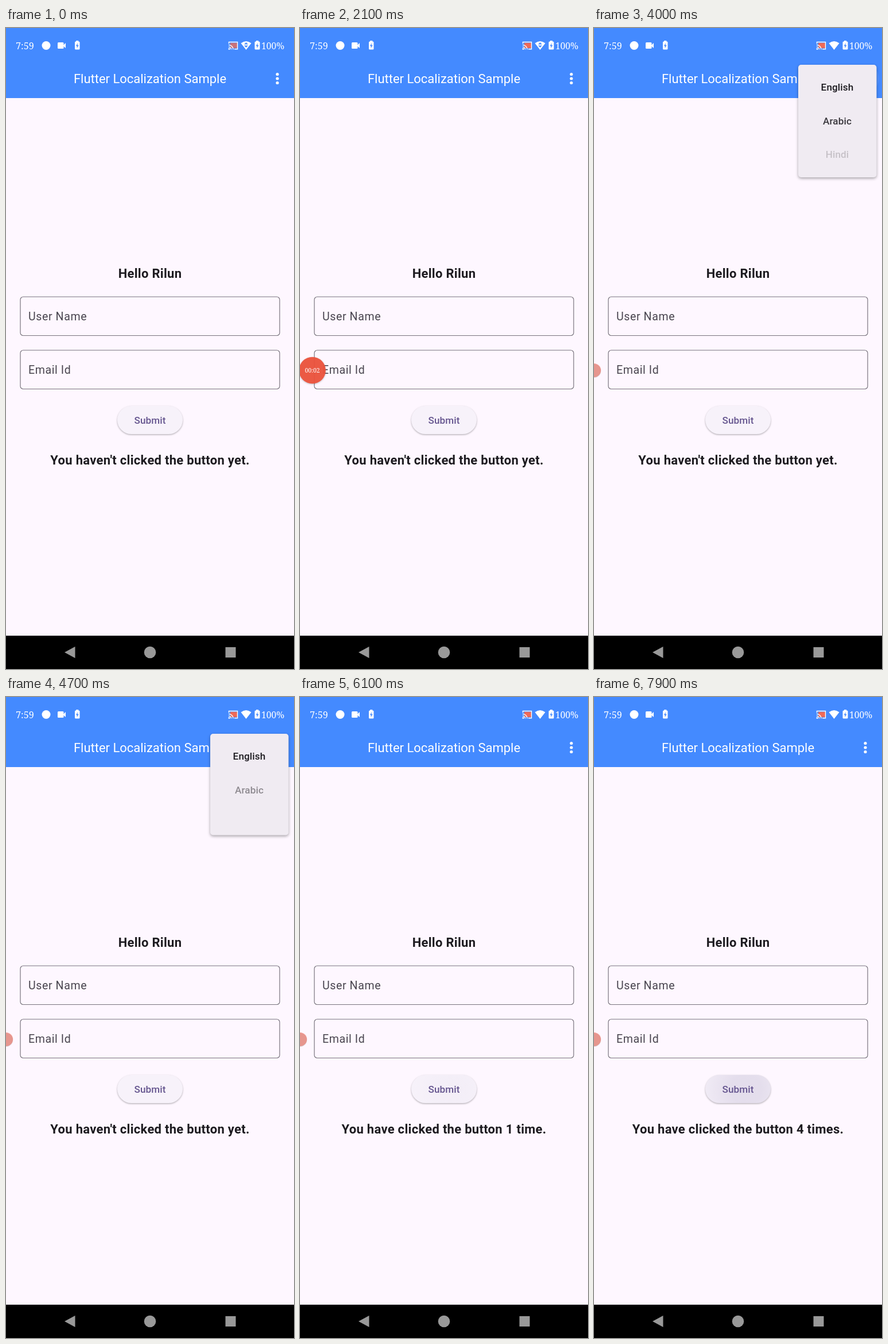
Recreate the animation shown at these times as an HTML page with a canvas. Size 502 by 1116 pixels, loop 8000 ms.

```html
<!DOCTYPE html>
<html lang="en">
<head>
<meta charset="utf-8">
<title>Flutter Localization Sample</title>
<style>
  html, body { margin: 0; width: 100%; height: 100%; overflow: hidden; background: #fef7ff; }
  canvas { display: block; width: 502px; height: 1116px; }
</style>
</head>
<body>
<canvas id="stage" width="502" height="1116"></canvas>
<script>
const ctx = document.getElementById('stage').getContext('2d');
const LOOP = 8000, STEP = 100;
const BLUE = '#448aff', INK = '#1d1b20', LABEL = '#49454f', PURPLE = '#65558f';
const SANS = 'Roboto, sans-serif', SERIF = '"Noto Serif", serif';
const BODY = `600 21.98px ${SANS}`, BUTTON = `500 17.1px ${SANS}`, INPUT = `19.54px ${SANS}`;

const clamp = x => Math.max(0, Math.min(1, x));
const interval = (x, from, to) => clamp((x - from) / (to - from));

function text(str, x, y, font, color, { align = 'center', spacing = 0 } = {}) {
  ctx.font = font;
  ctx.fillStyle = color;
  ctx.textAlign = align;
  ctx.letterSpacing = spacing + 'px';
  ctx.fillText(str, x, y);
}

function rect(x, y, w, h, color) {
  ctx.fillStyle = color;
  ctx.fillRect(x, y, w, h);
}

function disc(x, y, r, color) {
  ctx.fillStyle = color;
  ctx.beginPath();
  ctx.arc(x, y, r, 0, Math.PI * 2);
  ctx.fill();
}

function polygon(color, ...points) {
  ctx.fillStyle = color;
  ctx.beginPath();
  points.forEach(([x, y]) => ctx.lineTo(x, y));
  ctx.fill();
}

function roundPath(x, y, w, h, r) {
  ctx.beginPath();
  ctx.roundRect(x, y, w, h, r);
}

function shadow(color, blur, dy) {
  ctx.shadowColor = color;
  ctx.shadowBlur = blur;
  ctx.shadowOffsetY = dy;
}

// Saves and restores the drawing state around a group.
function group(draw) {
  ctx.save();
  draw();
  ctx.restore();
}

function battery(x, y, w) {
  rect(x + w / 2 - 2, y, 4, 3, '#fff');
  ctx.fillStyle = '#fff';
  roundPath(x, y + 1.5, w, 14, 1.5);
  ctx.fill();
  const c = x + w / 2;
  polygon(BLUE, [c + .8, y + 4], [c - 2.4, y + 9.5], [c - .3, y + 9.5],
    [c - .8, y + 13.5], [c + 2.4, y + 8], [c + .3, y + 8]);
}

function castIcon(bright) {
  rect(391, 26, 12, 9, bright ? '#ee6a58' : '#c9727a');
  ctx.strokeStyle = '#fff';
  ctx.lineWidth = 1.4;
  ctx.beginPath();
  ctx.moveTo(388.5, 27.5);
  ctx.lineTo(388.5, 24.5);
  ctx.lineTo(403.5, 24.5);
  ctx.lineTo(403.5, 36.8);
  ctx.lineTo(398, 36.8);
  ctx.stroke();
  for (const r of [4.5, 8]) {
    ctx.beginPath();
    ctx.arc(388, 37.5, r, -Math.PI / 2, 0);
    ctx.stroke();
  }
  disc(389, 36.5, 1.4, '#fff');
}

function wifiIcon(traffic) {
  ctx.fillStyle = '#fff';
  ctx.beginPath();
  ctx.moveTo(418.5, 38);
  ctx.lineTo(409.5, 26.5);
  ctx.quadraticCurveTo(418.5, 19.5, 427.5, 26.5);
  ctx.fill();
  if (traffic) {
    polygon(BLUE, [415, 28.5], [422, 28.5], [418.5, 25]);
    polygon(BLUE, [415, 30.5], [422, 30.5], [418.5, 34]);
  }
}

function header(t) {
  rect(0, 0, 502, 122, BLUE);
  text('7:59', 17, 36.5, `16.2px ${SERIF}`, '#fff', { align: 'left' });
  disc(70, 30.5, 7.5, '#fff');
  ctx.fillStyle = '#fff';
  roundPath(90, 25, 10.5, 11, 1.5);
  ctx.fill();
  polygon('#fff', [100, 30], [104, 26], [104, 35], [100, 31.5]);
  battery(120, 22, 8.5);
  castIcon(t >= 200);
  wifiIcon(t < 3100);
  battery(433.5, 22, 9);
  text('100%', 445, 36.5, `15.6px ${SERIF}`, '#fff', { align: 'left' });
  text('Flutter Localization Sample', 251, 96, `21.98px ${SANS}`, '#fff');
  for (const y of [80.5, 88, 95.5]) disc(473, y, 2.6, '#fff');

  const press = interval(t, 3600, 3800) * (1 - interval(t, 3850, 4100));
  if (press > 0) disc(473, 88, 24, `rgba(255,255,255,${.16 * press})`);
}

function field(label, y) {
  ctx.strokeStyle = '#79747e';
  ctx.lineWidth = 1.2;
  roundPath(25, y, 452, 67.5, 5);
  ctx.stroke();
  text(label, 39, y + 41, INPUT, LABEL, { align: 'left', spacing: .61 });
}

const taps = [6080, 6600, 7200, 7780];

function submitButton(t) {
  group(() => {
    shadow('rgba(0,0,0,.3)', 3, 1.3);
    ctx.fillStyle = '#f7f2fa';
    roundPath(194, 658, 114, 49, 24.5);
    ctx.fill();
  });
  group(() => {
    roundPath(194, 658, 114, 49, 24.5);
    ctx.clip();
    for (const start of taps) {
      const age = (t - start) / 600;
      if (age <= 0 || age >= 1) continue;
      const alpha = .13 * interval(age, 0, .17) * (1 - interval(age, .4, 1));
      const r = 62 + 70 * (1 - (1 - age) ** 2);
      const glow = ctx.createRadialGradient(265, 683, r * .3, 265, 683, r);
      glow.addColorStop(0, `rgba(101,85,143,${alpha})`);
      glow.addColorStop(1, `rgba(101,85,143,${alpha * .15})`);
      rect(194, 658, 114, 49, glow);
    }
  });
  text('Submit', 251, 689, BUTTON, PURPLE, { spacing: .12 });
}

function clickMessage(t) {
  if (t < 6100) return "You haven't clicked the button yet.";
  const count = 1 + Math.floor((t - 6100) / 600);
  return `You have clicked the button ${count} time${count > 1 ? 's' : ''}.`;
}

// The menu unfolds from its top right corner while its items fade in one by one.
function menu(t) {
  const closing = clamp(1 - (t - 4520) / 300);
  const v = t < 4520 ? interval(t, 3780, 4080) : clamp(closing * 1.5);
  if (v <= 0) return;
  const items = ['English', 'Arabic', 'Hindi'];
  const unit = 1 / (items.length + 1.5);
  const w = 136.5 * interval(v, 0, unit);
  const h = 196 * interval(v, 0, unit * items.length);
  group(() => {
    ctx.globalAlpha = interval(v, 0, 1 / 3);
    group(() => {
      shadow('rgba(0,0,0,.35)', 5, 2);
      ctx.fillStyle = '#f0ebf2';
      roundPath(492.5 - w, 64, w, h, 5);
      ctx.fill();
    });
    roundPath(492.5 - w, 64, w, h, 5);
    ctx.clip();
    if (t >= 4600 && t < 4700) rect(356, 74, 137, 58.6, 'rgba(29,27,32,.08)');
    const base = ctx.globalAlpha;
    items.forEach((item, i) => {
      const start = (i + 1) * unit;
      ctx.globalAlpha = base * interval(v, start, start + 1.5 * unit);
      text(item, 424, 109 + i * 58.6, BUTTON, INK, { spacing: .12 });
    });
  });
}

// The recording timer pops out of the left edge, then docks there, small and faint.
function timerBubble(t) {
  if (t < 100) return;
  const dock = t < 3500 ? 1 - interval(t, 0, 400) : interval(t, 3500, 3800);
  const x = 21.5 * (1 - dock);
  const scale = 1 - .48 * dock;
  const seconds = Math.min(3, Math.floor((t - 100) / 1000));
  group(() => {
    ctx.translate(x, 596);
    ctx.scale(scale, scale);
    ctx.globalAlpha = .95 - .45 * Math.sqrt(dock);
    group(() => {
      shadow('rgba(0,0,0,.25)', 3 * (1 - dock), 1);
      disc(0, 0, 23.3, '#ee543e');
    });
    ctx.globalAlpha = 1 - dock;
    text(`00:0${seconds}`, 0, 3.8, `10.3px ${SERIF}`, '#fff');
  });
}

function navBar() {
  rect(0, 1058, 502, 58, '#000');
  polygon('#999', [102, 1087], [120.5, 1077], [120.5, 1097]);
  disc(251, 1087, 10.3, '#999');
  rect(382.5, 1078, 18, 18, '#999');
}

function draw(t) {
  rect(0, 0, 502, 1116, '#fef7ff');
  header(t);
  text('Hello Rilun', 251, 435, BODY, INK, { spacing: .305 });
  field('User Name', 468);
  field('Email Id', 561);
  submitButton(t);
  text(clickMessage(t), 251, 760, BODY, INK, { spacing: .305 });
  menu(t);
  timerBubble(t);
  navBar();
}

const origin = performance.now();
function tick() {
  const t = (performance.now() - origin) % LOOP;
  draw(Math.floor(t / STEP) * STEP);
  requestAnimationFrame(tick);
}
tick();
</script>
</body>
</html>
```
